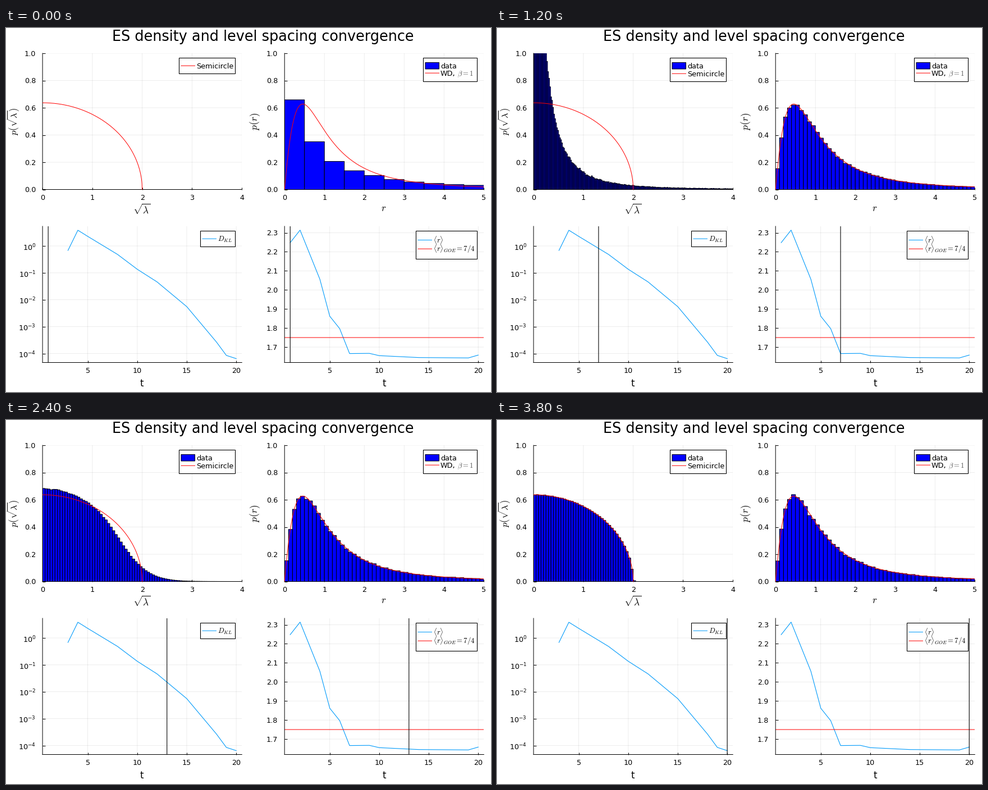
Write a matplotlib script that moves like this. It is 864 by 648 pixels and loops after 4 s.

```python
import numpy as np
import matplotlib.pyplot as plt
from matplotlib.animation import FuncAnimation
from matplotlib.collections import PolyCollection
from matplotlib.patches import Rectangle

W, H, STEPS = 864, 648, 20
SKY = "#009AFA"
FS = 12.75
plt.rcParams.update({"font.family": "DejaVu Sans", "mathtext.fontset": "cm",
                     "path.snap": False})

fig = plt.figure(figsize=(W / 72, H / 72), dpi=72, facecolor="white")

# Overlay in pixel units, y downwards: labels and legends
top = fig.add_axes([0, 0, 1, 1], zorder=10)
top.set(xlim=(0, W), ylim=(H, 0))
top.axis("off")


def write(x, y, s, size=FS, ha="center", va="baseline", **kw):
    return top.text(x, y, s, fontsize=size, ha=ha, va=va, **kw)


def panel(x, y, xlim, ylim, xticks, yticks, ylabels):
    w, h = 355.1, 242.5
    ax = fig.add_axes([x / W, 1 - (y + h) / H, w / W, h / H])
    ax.set(xlim=xlim, ylim=ylim, xticks=xticks, yticks=yticks)
    ax.set_axisbelow(True)
    ax.grid(color="black", alpha=0.1, lw=0.7)
    ax.tick_params(direction="in", length=4.5, width=1,
                   labelbottom=False, labelleft=False)
    ax.spines[["top", "right"]].set_visible(False)
    ax.spines[["left", "bottom"]].set_linewidth(1)
    for v in xticks:
        px = x + w * (v - xlim[0]) / (xlim[1] - xlim[0])
        write(px, y + h + 18.5, str(v))
    for v, s in zip(yticks, ylabels):
        py = y + h * (ylim[1] - v) / (ylim[1] - ylim[0])
        if "$" in s:
            write(x - 12, py + 8, s, ha="right", math_fontfamily="dejavusans")
        else:
            write(x - 12, py + 4.6, s, ha="right")
    return ax


def legend(x0, y0, x1, y1, rows):
    """rows: (y, colour, is_bar, label)"""
    parts = [top.add_patch(Rectangle((x0 + 0.5, y0 + 0.5), x1 - x0, y1 - y0,
                                     fc="white", ec="black", lw=1.1))]
    for y, color, is_bar, label in rows:
        if is_bar:
            parts.append(top.add_patch(Rectangle(
                (x0 + 4, y - 5.8), 24.5, 11.6, fc=color, ec="black", lw=1)))
        else:
            parts += top.plot([x0 + 4, x0 + 28.5], [y, y], color=color, lw=1)
        parts.append(write(x0 + 31, y + 4.8, label, ha="left"))
    return parts


unit = np.arange(6) / 5
unit_labels = [f"{v:.1f}" for v in unit]
levels = np.arange(17, 24) / 10
times = np.arange(1, STEPS + 1)
tlim, tticks = (0.43, 20.57), (5, 10, 15, 20)
ax_dens = panel(65.1, 45, (0, 4), (0, 1), range(5), unit, unit_labels)
ax_ratio = panel(496.2, 45, (0, 5), (0, 1), range(6), unit, unit_labels)
ax_kl = panel(65.1, 353, tlim, (-4.334, 0.731), tticks,
              range(-4, 1), [f"$10^{{{e}}}$" for e in range(-4, 1)])
ax_mean = panel(496.2, 353, tlim, (1.619, 2.334), tticks,
                levels, [f"{v:.1f}" for v in levels])

write(457.5, 23.2, "ES density and level spacing convergence", 25.5)
write(242, 330.5, r"$\sqrt{\lambda}$", 17)
write(673, 326, "$r$", 17)
write(242, 637.5, "t", 16.5)
write(673.5, 637.5, "t", 16.5)
write(14, 166, r"$p(\sqrt{\lambda})$", 16.5, va="center", rotation=90)
write(444, 166.5, "$p(r)$", 17.5, va="center", rotation=90)

plain_key = legend(308, 53, 408, 81, [(67.2, "red", False, "Semicircle")])
data_key = legend(308, 53, 408, 95, [(67.2, "blue", True, "data"),
                                     (81.2, "red", False, "Semicircle")])
legend(743, 53, 839, 95, [(67.2, "blue", True, "data"),
                          (80.2, "red", False, "WD,")])
write(804, 84.5, r"$\beta=1$", 12.5, ha="left", color="#555555")
legend(346, 361, 408, 389, [(375.2, SKY, False, "$D_{KL}$")])
legend(730, 361, 839, 411, [
    (377.5, SKY, False, r"$\langle r\rangle$"),
    (393.2, "red", False, r"$\langle r\rangle_{GOE}=7/4$")])


def semicircle(x):
    return np.sqrt(np.clip(4 - x * x, 0, None)) / np.pi


def wigner(r):
    return 27 / 8 * (r + r * r) / (1 + r + r * r) ** 2.5


def poisson(r):
    return 1 / (1 + r) ** 2


xs = np.linspace(0, 2, 400)
ax_dens.plot(xs, semicircle(xs), color="red", lw=1, zorder=3)
rs = np.linspace(0, 5, 500)
ax_ratio.plot(rs, wigner(rs), color="red", lw=1, zorder=3)

# Bend points of the two convergence curves
log_kl = np.interp(times[2:], [3, 4, 5, 8, 10, 12, 15, 18, 19, 20],
                   [-.167, .585, .355, -.313, -.867, -1.337, -2.256, -3.572, -4.07, -4.19])
mean_r = np.interp(times, [1, 2, 4, 5, 6, 7, 9, 10, 14, 19, 20],
                   [2.248, 2.314, 2.056, 1.862, 1.797, 1.666, 1.667, 1.655, 1.645, 1.643, 1.658])
ax_kl.plot(times[2:], log_kl, color=SKY, lw=1.1)
ax_mean.plot(times, mean_r, color=SKY, lw=1.1)
ax_mean.axhline(1.75, color="red", lw=1)
markers = [ax.axvline(1, color="black", lw=1.1, zorder=2.2)
           for ax in (ax_kl, ax_mean)]

z = np.linspace(-4, 4, 401)
gauss = np.exp(-z * z / 2)
gauss /= gauss.sum()


def spread_density(x, t):
    """Semicircle with a log-normal radius whose spread shrinks over time."""
    u = t - 9
    var = np.exp(-0.55 - 0.52 * u - 0.03 * u * u)
    scale = np.exp(np.sqrt(var) * z - var)
    return (semicircle(x[..., None] / scale) / scale) @ gauss


def histogram(f, width, end, noise, rng):
    left = np.arange(round(end / width)) * width
    inner = (np.arange(10) + 0.5) / 10 * width
    h = f(left[:, None] + inner).mean(axis=1)
    h += noise * np.sqrt(h) * rng.standard_normal(h.size)
    return left, np.clip(h, 0, None), width


def sparse_bars(t, rng):
    """Spike at zero plus a thin scatter of tiny bars."""
    width = 0.005
    left = np.arange(800) * width
    env = 0.056 * (1 - np.exp(-left / 0.1)) / (1 + (left / 1.2) ** 1.3)
    h = env * rng.uniform(0.35, 1, left.size)
    if t < 5:
        h *= (rng.random(left.size) < 0.3 * (t - 2) - 0.2) * (left > 0.31)
    h[0] = 2
    return left, h, width


def density_bars(t):
    rng = np.random.default_rng(100 + t)
    if t < 3:
        return np.zeros(0), np.zeros(0), 1
    if t < 6:
        return sparse_bars(t, rng)
    width = 0.01 if t == 6 else 0.02 if t == 7 else 0.05
    noise = 0.011 if t < 8 else 0.002
    return histogram(lambda x: spread_density(x, t), width, 4, noise, rng)


def ratio_bars(t):
    rng = np.random.default_rng(200 + t)
    width = 0.5 if t < 3 else 0.2 if t < 6 else 0.1
    w = max(0, 0.9 - 0.15 * (t - 1))
    return histogram(lambda r: w * poisson(r) + (1 - w) * wigner(r),
                     width, 5, 0.008, rng)


def rects(left, h, width):
    right, zero = left + width, np.zeros_like(h)
    xy = [(left, zero), (left, h), (right, h), (right, zero)]
    return np.stack([np.stack(p, 1) for p in xy], 1)


bars = []
for ax in (ax_dens, ax_ratio):
    coll = PolyCollection([], facecolor="blue", edgecolor="black", lw=1, zorder=2)
    bars.append(ax.add_collection(coll, autolim=False))


def update(i):
    t = i + 1
    for coll, data in zip(bars, (density_bars(t), ratio_bars(t))):
        coll.set_verts(rects(*data))
    for m in markers:
        m.set_xdata([t, t])
    for part in plain_key:
        part.set_visible(t < 3)
    for part in data_key:
        part.set_visible(t >= 3)
    return bars + markers


anim = FuncAnimation(fig, update, frames=STEPS, interval=200,
                     repeat=True, repeat_delay=0, blit=False)
plt.show()
```
